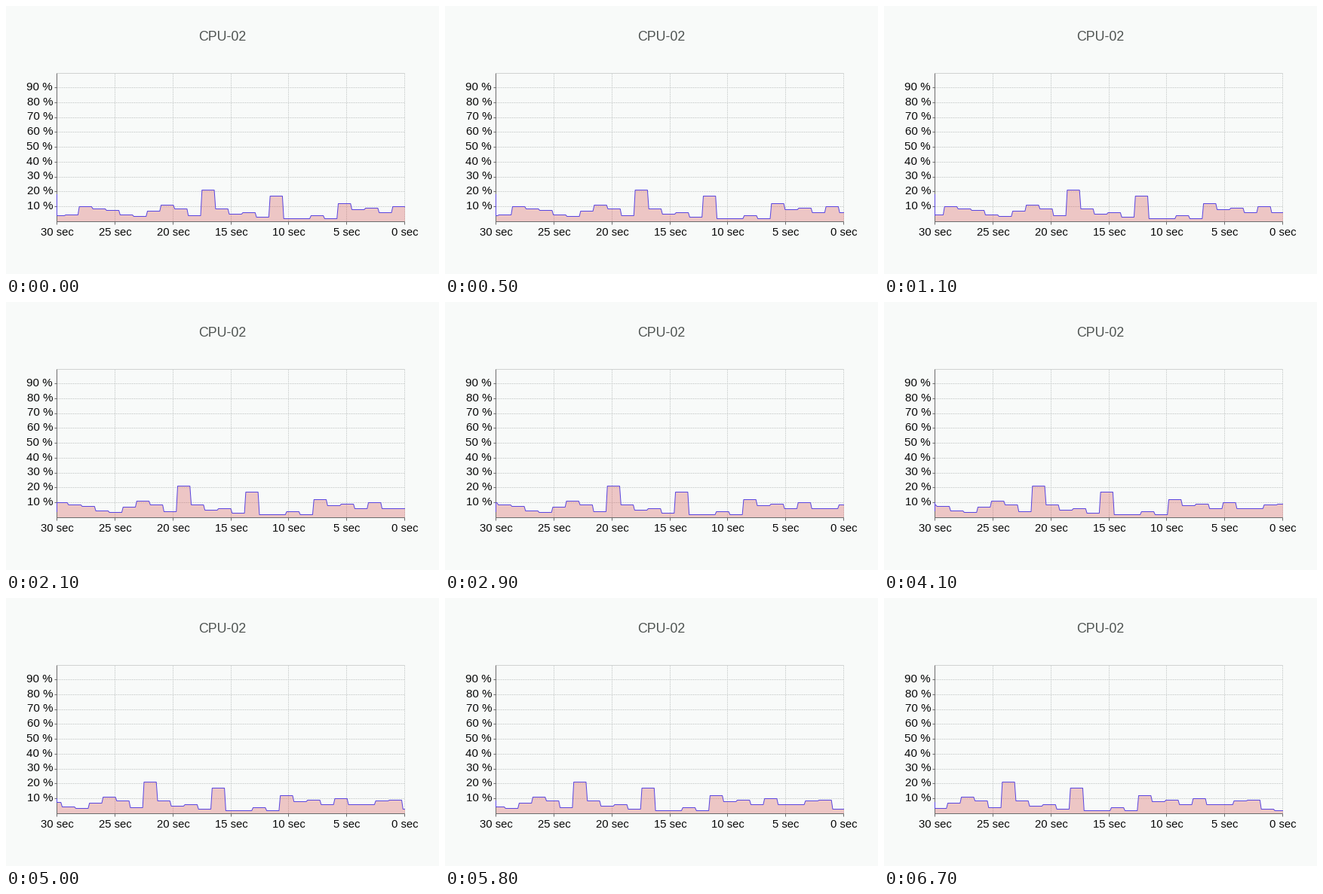
Recreate the animation shown at these times as a matplotlib script. Size 574 by 356 pixels, loop 6.8 s.

```python
import numpy as np
import matplotlib.pyplot as plt
from matplotlib.animation import FuncAnimation
from matplotlib.patches import Polygon, Rectangle

W, H, DPI = 574, 356, 100
FRAMES, STEP_MS = 68, 100
LEFT, RIGHT, TOP, BASE = 67.5, 528.5, 89.1, 286.2
PX = 72 / DPI                      # one pixel in points
SPEED = (RIGHT - LEFT) / 30        # pixels per second
PERIOD, RAMP = 18.07, 0.9          # sample width and half ramp, in pixels

LOAD = np.array([4, 18, 4, 4.5, 10, 8.5, 7.5, 4.5, 3.5, 7, 11, 8.5, 3.7, 21,
                 8.5, 5, 6, 3, 17, 2, 2, 4, 2, 12, 8, 9, 6, 10, 6, 6, 8.5, 9,
                 3, 2])
ENDS = 78.2 + PERIOD * (np.arange(len(LOAD)) - 2)

plt.rcParams["font.family"] = "Liberation Sans"
fig = plt.figure(figsize=(W / DPI, H / DPI), dpi=DPI, facecolor="#f8faf9")
ax = fig.add_axes([0, 0, 1, 1])
ax.set(xlim=(0, W), ylim=(H, 0))
ax.axis("off")


def y_of(percent):
    return BASE - (BASE - TOP) * percent / 100


def segment(x0, y0, x1, y1, color, **kw):
    # Whole coordinates snap to the centre of their own pixel.
    ax.plot(np.floor([x0, x1]), np.floor([y0, y1]), color=color, lw=PX,
            solid_capstyle="butt", snap=True, **kw)


def label(x, y, text, size, color="#080808", ha="center"):
    ax.text(x, y, text, fontsize=size * PX, color=color, ha=ha, va="baseline")


def draw_grid():
    grid = dict(color="#d0d3d2", zorder=1)
    dots = dict(grid, dashes=(2, 1))
    axis = dict(color="#6c6c6c", zorder=3)
    segment(LEFT, TOP, RIGHT, TOP, **grid)
    segment(RIGHT, TOP, RIGHT, BASE, **dots)
    for percent in range(10, 100, 10):
        y = y_of(percent)
        segment(LEFT, y, RIGHT, y, **dots)
        segment(LEFT - 3, y, LEFT, y, **axis)
        label(62, y + 3.2, f"{percent} %", 15.1, ha="right")
    for sec in range(30, -1, -5):
        x = RIGHT - sec * SPEED
        if 0 < sec < 30:
            segment(x, TOP, x, BASE, **dots)
        segment(x, BASE, x, BASE + 4, **axis)
        label(x + 0.5, 304.6, f"{sec} sec", 14.9)
    segment(LEFT, TOP, LEFT, BASE + 1, **axis)
    segment(LEFT, BASE, RIGHT, BASE, **axis)


def trace(t):
    """Visible steps; the two samples just left of the plot are pinned to its edge."""
    ends = ENDS - SPEED * t
    first = max(int(np.sum(ends < LEFT)) - 2, 0)
    x = np.column_stack([ends - PERIOD + RAMP, ends - RAMP])[first:].ravel()
    y = np.repeat(np.floor(y_of(LOAD[first:])) + 0.5, 2)
    return np.maximum(x, LEFT), y


draw_grid()
label(287, 46.5, "CPU-02", 17.8, "#4f5452")

window = Rectangle((LEFT - 0.5, TOP), RIGHT - LEFT + 1, BASE - TOP + 0.5,
                   transform=ax.transData)
area = ax.add_patch(Polygon([(0, 0), (1, 0), (1, 1)], fc=(0.83, 0.31, 0.31, 0.3),
                            ec="none", zorder=2))
line, = ax.plot([], [], color="#5a46e0", lw=PX, zorder=4, snap=False,
                solid_joinstyle="miter")
for artist in (area, line):
    artist.set_clip_path(window)


def update(i):
    x, y = trace(i * STEP_MS / 1000)
    line.set_data(x, y)
    area.set_xy(np.column_stack([np.r_[LEFT, x, x[-1]], np.r_[BASE, y, BASE]]))
    return area, line


anim = FuncAnimation(fig, update, frames=FRAMES, interval=STEP_MS, repeat=True,
                     repeat_delay=0)
plt.show()
```
